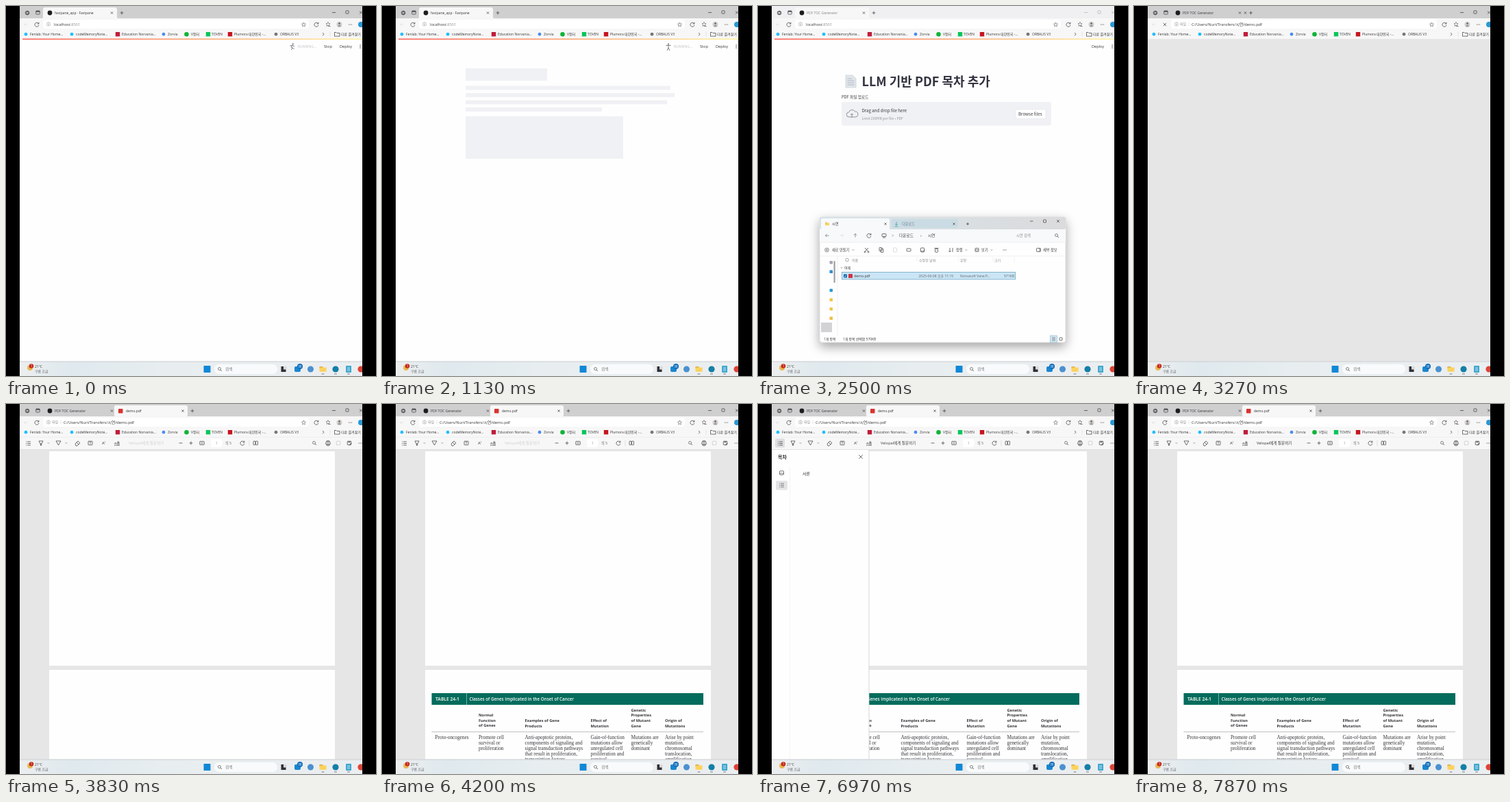
Animation of 540 by 540 pixels, one loop 8 s. Source, as an HTML page:

```html
<!DOCTYPE html>
<html>
<head>
<meta charset="utf-8">
<title>PDF TOC demo</title>
<style>
html, body { margin: 0; width: 100%; height: 100%; overflow: hidden; background: #000; }
svg { display: block; width: 100vw; height: 100vh; }
text { font-family: "Open Sans", "Noto Sans CJK KR", "Noto Sans CJK", sans-serif; white-space: pre; }
.kr text, text.kr { font-family: "Noto Sans CJK KR", "Noto Sans CJK", sans-serif; }
.serif text { font-family: "Liberation Serif", serif; }
</style>
</head>
<body>
<svg id="stage" viewBox="0 0 540 540"></svg>
<script>
const INK = '#36363a', DIM = '#8b8b90', PAPER = '#fefefe', BAR = '#f7f7f7', GRAY = '#e6e6e7', RULE = '#e0e0e2';

const attrs = o => Object.entries(o).map(([k, v]) => ` ${k}="${v}"`).join('');
const text = (x, y, size, s, o = {}) =>
  `<text${attrs({ x, y, 'font-size': size, fill: INK, ...o })}>${s}</text>`;
const rect = (x, y, width, height, fill, o = {}) =>
  `<rect${attrs({ x, y, width, height, fill, ...o })}/>`;
const dot = (cx, cy, r, fill, o = {}) => `<circle${attrs({ cx, cy, r, fill, ...o })}/>`;
const line = (d, o = {}) =>
  `<path${attrs({ d, fill: 'none', stroke: INK, 'stroke-width': 0.7, ...o })}/>`;
const group = (id, body, o = {}) => `<g${attrs({ id, ...o })}>${body}</g>`;
const lines = (x, y, gap, size, list, o) =>
  list.map((s, i) => text(x, y + i * gap, size, s, o)).join('');

// small line icons
const cross = (x, y, r = 1.6, o) => line(`M${x - r} ${y - r}l${2 * r} ${2 * r}m0 ${-2 * r}l${-2 * r} ${2 * r}`, o);
const plus = (x, y, r = 2.4, o) => line(`M${x - r} ${y}h${2 * r}M${x} ${y - r}v${2 * r}`, o);
const caret = (x, y, o) => line(`M${x - 1.3} ${y - .6}l1.3 1.3 1.3-1.3`, { 'stroke-width': .5, ...o });
const box = (x, y, w, h, o = {}) => rect(x - w / 2, y - h / 2, w, h, 'none', { stroke: INK, 'stroke-width': .7, rx: .8, ...o });
const ring = (x, y, r, o = {}) => dot(x, y, r, 'none', { stroke: INK, 'stroke-width': .6, ...o });
const more = (x, y) => [-2, 0, 2].map(d => dot(x + d, y, .55, INK)).join('');
const lens = (x, y) => ring(x - .5, y - .5, 2) + line(`M${x + 1} ${y + 1}l2 2`);
const spin = (x, y) => line(`M${x + 2.6} ${y - 1.2}a3 3 0 1 0 .3 2M${x + 2.9} ${y - 3.2}v2.2h-2.2`);
const star = (x, y) => line(`M${x} ${y - 3}l.9 2 2.1.2-1.6 1.5.5 2.2-1.9-1.1-1.9 1.1.5-2.2-1.6-1.5 2.1-.2z`, { 'stroke-width': .5 });
const folder = (x, y, w = 9) =>
  rect(x - w / 2, y - w * .38, w * .5, w * .3, '#dfa22c', { rx: .6 }) + rect(x - w / 2, y - w * .25, w, w * .62, '#fad25c', { rx: .8 });
const arrow = (x, y, turn, o) => `<g transform="translate(${x} ${y}) rotate(${turn})">${line('M-2.6 0h5.2M.4-2l2.2 2-2.2 2', { 'stroke-width': .5, ...o })}</g>`;

function windowFrame() {
  let s = rect(20, 0, 500, 18, '#cfcfd0', { id: 'tabbar' });
  s += ring(31, 10, 2.8, { 'stroke-width': .8 }) + line('M30 8.5h3v3h-3z') + box(46.5, 9.5, 5.5, 5) + line('M44 8h5', { 'stroke-width': 1.4 });
  s += group('tab1Bg', line('M52 18q2 0 2-2V5q0-3 3-3h102q3 0 3 3v11q0 2 2 2z', { fill: BAR, stroke: 'none' }));
  s += dot(64, 10, 3.4, '#1d1d20') + cross(154.5, 10);
  s += group('titleA', text(71, 12, 5, 'fastpane_app · Fastpane'));
  s += group('titleB', text(71, 12, 5, 'PDF TOC Generator'));
  s += group('tab2', rect(158, 2, 9, 16.5, BAR, { id: 'tab2Bg', rx: 2.5 }) +
    group('tab2Label', rect(164, 7, 6.5, 6.5, '#d8342f', { rx: .8 }) + text(175, 12, 5, 'demo.pdf')) +
    group('close2', cross(0, 10)));
  s += group('newTab', plus(0, 10));
  s += group('winButtons', line('M476 9.5h5') + box(498, 9, 4.2, 4.2) + cross(518, 9.5, 2));
  s += rect(20, 18, 500, 31, BAR);
  s += rect(54, 20, 388, 13, '#fff', { rx: 4 });
  s += arrow(29, 27, 180, { stroke: '#d4d4d6' });
  s += group('reload', spin(45, 27)) + group('stopLoad', cross(45, 27, 2.2));
  s += ring(62, 26.5, 2.7, { stroke: DIM, 'stroke-width': .5 }) + line('M62 26v2M62 24.6v.7', { 'stroke-width': .5 });
  s += group('urlApp', text(70, 28.5, 5.7, 'localhost<tspan fill="#8f8f94">:8501</tspan>'));
  s += group('urlFile', text(67, 28.4, 5, '파일', { fill: DIM }) + line('M80 24v5', { stroke: '#c8c8ca', 'stroke-width': .5 }) +
    text(84, 28.5, 5.7, 'C:/Users/Nuri/Transfers/시연/demo.pdf'));
  s += star(434.5, 27) + spin(453, 27) + star(470, 26.5) + line('M470 29.5h4', { 'stroke-width': .5 });
  s += dot(486.5, 27, 4.2, '#d5d3d1') + dot(486.5, 25.6, 1.5, '#75706c') + line('M483.8 29.6q2.7-3 5.4 0z', { fill: '#75706c', stroke: 'none' });
  s += more(502.5, 27) + dot(518, 27, 4, '#2b97d3');
  const marks = [
    [29, 35, '#20beff', 'Fenlab: Your Home...'], [96, 102, '#20beff', 'codeMemoryNote...'],
    [163, 169, '#c01c3a', 'Education Norvania...'], [230, 236, '#4c8df0', 'Zorvia'],
    [263.5, 270, '#10b338', 'V장터'], [295, 300, '#08c55b', 'TOVEN'],
    [327, 333, '#c4161f', 'Plumora 대한민국 -...'], [394, 400, '#77777c', 'ORBALIS V3']];
  marks.forEach(([ix, tx, c, label], i) => {
    s += [2, 5, 6].includes(i) ? rect(ix - 3.2, 38, 6.4, 6.4, c) : dot(ix, 41.2, i === 4 ? 3.3 : 2.4, c);
    s += text(tx, 43.2, 5, label);
  });
  s += line('M462 39l2 2.2-2 2.2') + line('M473 37v8', { stroke: '#d0d0d2', 'stroke-width': .5 });
  s += line('M479.5 38.5h2.5l1 1h4v4.6h-7.5z') + text(489, 43.2, 5, '다른 즐겨찾기');
  return s;
}

function appPage() {
  let s = rect(20, 48, 500, 471, PAPER);
  s += rect(24, 47.6, 496, 1.5, 'url(#glow)');
  s += text(487, 61, 5.6, 'Deploy') + [-2.2, 0, 2.2].map(d => dot(517, 59 + d, .65, INK)).join('');
  const poses = ['M0-1.5l-2 2.5 2 1-1.5 3M0 2l2.5 1.5M-3.5-1l3.5-.5 3 1.5', 'M0-2v4l-2 4M0 2l2 4M-3.5-1.5h7', 'M0-2l-1 3.5 2.5 1.5-1 3M-1 1.5l-3 2.5M0-1.5l3-2.5'];
  s += group('running',
    poses.map((d, i) => `<g id="pose${i}" transform="translate(418 59)">${dot(i ? 0 : .8, -3.5, 1.1, '#6c6d75')}${line(d, { stroke: '#6c6d75', 'stroke-width': .9 })}</g>`).join('') +
    text(426, 60.8, 5, 'RUNNING...', { fill: '#bfc0c6' }) + text(464, 61, 5.6, 'Stop'));
  const bones = [[91, 119, 18], [116.5, 299, 6], [127, 305, 6], [137.5, 294, 6], [148, 199, 6], [161, 230, 62]];
  s += group('skeleton', bones.map(([y, w, h]) => rect(122, y, w, h, '#f0f1f4', { rx: 1 })).join(''));
  let app = line('M128 101h10l5 5v13h-15z', { fill: '#e1e6ea', stroke: '#c6ced4' }) + line('M130.5 106h7m-7 3h10m-10 3h10m-10 3h10', { stroke: '#9aa8b2' });
  app += text(151.5, 116.5, 18, 'LLM 기반 PDF 목차 추가', { 'font-weight': 700, fill: '#31333f' });
  app += text(122, 135, 5.7, 'PDF 파일 업로드');
  app += rect(122, 140, 306, 34.5, '#f0f1f4', { rx: 3 });
  app += line('M133 162a3.5 3.5 0 0 1-.4-7 5 5 0 0 1 9-1 4 4 0 0 1 .6 8zM137 163v-6m-2 2l2-2 2 2', { stroke: '#85868f', 'stroke-width': .9 });
  app += text(151.5, 155, 6.2, 'Drag and drop file here') + text(151.5, 165.5, 5.1, 'Limit 200MB per file • PDF', { fill: '#94959d' });
  app += rect(376, 151, 44, 13.5, '#fff', { rx: 3, stroke: '#e3e4e8', 'stroke-width': .6 }) + text(380, 159.6, 6.2, 'Browse files');
  return s + group('upload', app, { class: 'kr' });
}

function explorer() {
  let s = rect(90, 308, 359, 183, PAPER, { rx: 3, stroke: '#bcbcc0', 'stroke-width': .5, filter: 'url(#shadow)' });
  s += rect(90, 308, 359, 18, 'url(#cap)', { rx: 3 }) + rect(92, 310, 100, 17, '#f7f9fa', { rx: 2 });
  s += rect(195, 311, 97, 13, '#cbdbe3', { rx: 2 });
  s += folder(101, 318, 6) + text(108, 320, 5.2, '시연') + cross(186, 318, 1.5);
  s += line('M202 315v5m-1.8-1.8l1.8 1.8 1.8-1.8m-4 3.6h4.4', { stroke: '#1f9aa0' }) + text(210, 320, 5.2, '다운로드', { fill: '#5d7f8e' }) + cross(286, 318, 1.5) + plus(306, 318, 2);
  s += line('M397 314h4.4') + box(418.5, 314, 4, 4) + cross(438, 314, 1.9);
  s += rect(90, 326, 359, 19, '#f7f9fa');
  s += arrow(101, 335, 180) + arrow(122, 335, 0, { stroke: '#c8c8cc' }) + arrow(142, 335, -90) + spin(162, 335);
  s += box(184, 334.5, 6, 4) + line('M182 338h4') + line('M196 333.5l1.5 1.5-1.5 1.5', { 'stroke-width': .5 });
  s += text(206, 337, 5.7, '다운로드') + text(237, 337, 5.7, '›') + text(248, 337, 5.7, '시연');
  s += text(377, 337, 5.3, '시연 검색', { fill: DIM }) + lens(436, 335);
  s += line('M90 345h359M90 365h359', { stroke: RULE, 'stroke-width': .5 });
  s += ring(100.5, 356, 2.8) + plus(100.5, 356, 1.5, { 'stroke-width': .5 }) + text(108, 358, 5.2, '새로 만들기') + caret(139, 356);
  s += line('M156 353l5 5.5m0-5.5l-5 5.5') + ring(156, 359, 1) + ring(161, 359, 1);
  s += box(179, 355, 4, 5) + box(181, 357, 4, 5) + box(200, 356, 5, 6, { stroke: '#cfcfd2' }) + box(220, 356, 6, 4) + box(240, 356, 5, 6) + line('M238 358h4l1-2') + box(260.5, 356.8, 4, 5) + line('M257.5 353.5h6');
  s += line('M280 353v6m-1.5-1.5l1.5 1.5 1.5-1.5M284 359v-6') + text(289, 358, 5.2, '정렬') + caret(304, 356);
  s += box(319.5, 356, 5, 5) + line('M317 356h5') + text(326, 358, 5.2, '보기') + caret(341, 356) + more(360, 356);
  s += box(409.5, 356, 6, 5) + line('M411 354v4') + text(416, 358, 5.2, '세부 정보');
  ['#a9a3b4', '#2f8fd0', 'none', '#2c9bd6', '#f3c34a', '#f3c34a', '#efbd48'].forEach((c, i) =>
    s += rect(104.5, 372 + i * 13.6, 4.5, 4.5, c, { rx: .7 }));
  s += rect(92, 462, 16, 14, '#d3d3d5') + rect(110.5, 372, 2.2, 32, '#a0a0a4', { rx: 1 }) + line('M116 366v115', { stroke: RULE, 'stroke-width': .5 });
  s += box(130, 370.5, 4, 4, { stroke: DIM });
  [[137, '이름'], [235, '수정한 날짜'], [295, '유형'], [345, '크기']].forEach(([x, l]) => s += text(x, 372.5, 5, l, { fill: DIM }));
  s += line('M232 367v7M293 367v7M343 367v7M374 367v7', { stroke: RULE, 'stroke-width': .4 });
  s += caret(122, 382) + text(126, 384.2, 5, '어제');
  s += group('rowHover', rect(122.5, 388.5, 253, 10.5, '#e5f3fb'));
  s += group('rowPick', rect(122.5, 388.5, 253, 10.5, '#cbe5f5', { stroke: '#5f9fbd', 'stroke-width': .7 }) +
    rect(125, 391.5, 5, 5, '#0f67b0', { rx: .7 }) + line('M126 394l1.2 1.2 2-2.3', { stroke: '#fff' }));
  s += rect(132, 391, 6, 6, '#cf3442', { rx: .6 }) + text(140, 396, 5.2, 'demo.pdf');
  [[234.5, '2025-06-08 오후 11:15'], [295, 'Norvasoft Vane P...'], [359, '571KB']].forEach(([x, l]) => s += text(x, 396, 5, l, { fill: '#5f666c' }));
  s += text(96, 488, 4.9, '1개 항목') + group('status', text(124, 488, 4.9, '1개 항목 선택함 570KB'));
  return s + rect(426.5, 481, 10, 10, '#d3e7f3', { stroke: '#79a9c4', 'stroke-width': .5 }) + line('M429 484h5m-5 2h5m-5 2h5', { 'stroke-width': .5 }) + box(442, 486, 4, 4);
}

function pdfPages() {
  let s = group('sheet', rect(63, 69, 417, 313, PAPER) + rect(63, 388, 417, 131, PAPER));
  let t = rect(72.5, 422, 396.5, 17, '#046c5c') + line('M123.5 422v17', { stroke: '#8fc0b4', 'stroke-width': .8 });
  t += text(78, 433, 6.6, 'TABLE 24-1', { fill: '#d9e8dc', 'font-weight': 700 }) +
    text(127.5, 433, 6.25, 'Classes of Genes Implicated in the Onset of Cancer', { fill: '#fff', 'font-weight': 600 });
  const heads = [[141, 456, 'Normal|Function|of Genes'], [208.5, 464, 'Examples of Gene|Products'], [304.5, 464, 'Effect of|Mutation'],
    [363.5, 448.7, 'Genetic|Properties|of Mutant|Gene'], [413, 464, 'Origin of|Mutations']];
  heads.forEach(([x, y, s]) => t += lines(x, y, 7.7, 5.7, s.split('|'), { 'font-weight': 700 }));
  t += line('M72.5 478.5h396.5', { stroke: '#a3aaa8', 'stroke-width': .7 });
  const cells = [[77.5, 'Proto-oncogenes'], [141, 'Promote cell|survival or|proliferation'],
    [208.5, 'Anti-apoptotic proteins,|components of signaling and|signal transduction pathways|that result in proliferation,|transcription factors'],
    [304.5, 'Gain-of-function|mutations allow|unregulated cell|proliferation and|survival'],
    [363.5, 'Mutations are|genetically|dominant'], [413, 'Arise by point|mutation,|chromosomal|translocation,|amplification']];
  t += group('cells', cells.map(([x, s]) => lines(x, 489, 8, 7.3, s.split('|'))).join(''), { class: 'serif' });
  return rect(20, 48, 500, 471, GRAY) + s + group('table', t);
}

function pdfBar() {
  let s = rect(20, 48.5, 500, 18, BAR) + line('M20 66.5h500', { stroke: '#d6d6d8', 'stroke-width': .6 });
  s += group('tocOn', rect(25, 50.5, 14, 13, '#dedee0', { rx: 2 }));
  s += group('penHover', rect(65, 49.5, 22.5, 14, '#e4e4e6', { rx: 2 }));
  s += line('M29 55h1m1 0h5M29 57.5h1m1 0h5M29 60h1m1 0h5');
  s += line('M48 54h6l-2 4h-2zM50 58l1 3 1-3') + caret(62, 57) + line('M73 54h7l-3.5 6z') + caret(88, 57);
  s += line('M101 58l4-4 3 3-4 4h-2zM103 56l3 3') + box(123, 57, 6, 5.5) + line('M121.5 55.7h3M123 55.7v3', { 'stroke-width': .5 });
  s += text(140, 59.2, 6, 'A') + text(144, 56.5, 3.7, ')') + text(158, 59.2, 5.5, 'aあ') + line('M158 60.5h8', { 'stroke-width': .5 });
  s += group('askDim', text(179, 59.2, 5.6, 'Velopal에게 질문하기', { fill: '#d0d0d3' })) + group('askInk', text(179, 59.2, 5.6, 'Velopal에게 질문하기'));
  s += line('M252.5 57h5') + plus(270, 57, 2.5) + box(286, 57, 6.5, 5) + line('M284 57h4');
  s += rect(299, 51, 16, 12, '#fff', { rx: 1.5 }) + text(306, 59, 5, '1', { fill: DIM }) + text(320, 59, 5.2, '의 5', { fill: '#66666b' });
  s += spin(345, 57) + line('M355 53v8', { stroke: '#c6c6c9', 'stroke-width': .5 }) + box(362.5, 57, 3, 5.5) + box(366, 57, 3, 5.5);
  s += lens(450, 57) + box(470, 57.2, 6.5, 3.5) + box(470, 54.5, 4, 2) + box(470, 59.5, 4, 2.5);
  s += box(485, 57, 5.5, 5.5, { stroke: '#c3c3c6' }) + box(501, 57, 5.5, 5.5) + line('M499.5 55.5h3M501 60l3-3', { 'stroke-width': 1 }) + more(517, 57);
  return s;
}

function tocPanel() {
  let s = rect(20, 66.5, 142, 452.5, PAPER) + line('M162 66.5v452.5', { stroke: '#cdcdd0', 'stroke-width': .8 });
  s += text(29, 80, 7, '목차', { 'font-weight': 700, class: 'kr' }) + cross(150, 77, 2.8);
  s += rect(26, 112, 17, 13.5, '#e4e4e6', { rx: 1.5 }) + line('M46.5 92v427', { stroke: '#ededee', 'stroke-width': .6 });
  s += box(34.5, 100.5, 6, 5.5) + line('M32 102l2-1.5 1.5 1.5 1.5-1') + line('M31 116h1m1 0h5M31 118.5h1m1 0h5M31 121h1m1 0h5', { 'stroke-width': .6 });
  s += group('itemHover', rect(49, 95, 109, 14, '#f0f0f1', { rx: 2 }));
  return s + group('items', text(65, 104.3, 6, '서론'), { class: 'kr' });
}

function taskbar() {
  let s = rect(20, 518.5, 500, 21.5, 'url(#task)') + line('M20 519h500', { stroke: '#c3c6c9', 'stroke-width': .8 });
  s += dot(35, 528, 4, '#e9b955') + dot(37, 525.5, 3.3, '#c42b1c') + text(36, 527.2, 4.4, '1', { fill: '#fff' });
  s += text(42, 528, 5, '21°C') + text(42, 535, 5, '구름 조금', { fill: '#63666b' });
  s += rect(288.5, 525, 10, 10, '#1188d6', { rx: .8 });
  s += rect(304, 523, 92, 14, '#f9fafb', { rx: 6.5 }) + lens(312, 530) + text(320, 532, 5.8, '검색', { fill: '#75767b' });
  s += rect(401.5, 526, 7, 8, '#2f2f33') + rect(405, 526, 4.5, 4.5, '#d9d9dc');
  s += rect(421, 526, 9, 8, '#1a86d0', { rx: 2 }) + dot(429, 526, 4, '#0f6cbd') + text(426.3, 528, 4.5, '39', { fill: '#fff' });
  s += group('folderHover', rect(454, 521.5, 17, 17, '#f9fafb', { rx: 2 }));
  s += dot(444.5, 530, 4.5, '#4a90d0') + folder(462.5, 530, 10) + dot(481, 530, 4.6, '#157fa6') + rect(496, 525, 8, 10, '#3fa9cf', { rx: 1 }) + line('M498 528h4m-4 2h4m-4 2h4', { stroke: '#e6f3f8' });
  s += dot(518, 530, 4.6, '#db4437');
  return s + [462.5, 481, 500].map(x => rect(x - 2, 536.6, 4, 1, '#77787c', { rx: .5 })).join('');
}

const svg = document.getElementById('stage');
svg.innerHTML = `<defs>
<linearGradient id="glow"><stop offset="0" stop-color="#ff5a50"/><stop offset=".5" stop-color="#ff9f6a"/><stop offset="1" stop-color="#fff3a0"/></linearGradient>
<linearGradient id="cap"><stop offset="0" stop-color="#d5e3ea"/><stop offset=".55" stop-color="#d9dfe2"/><stop offset="1" stop-color="#dbdbdd"/></linearGradient>
<linearGradient id="task"><stop offset="0" stop-color="#eceeef"/><stop offset=".15" stop-color="#dfe9ee"/><stop offset=".45" stop-color="#e8eef0"/><stop offset="1" stop-color="#ebeef0"/></linearGradient>
<filter id="shadow" x="-20%" y="-20%" width="140%" height="150%"><feDropShadow dx="0" dy="6" stdDeviation="8" flood-color="#000" flood-opacity=".36"/></filter>
<clipPath id="view"><rect x="20" width="500" height="540"/></clipPath>
<clipPath id="content"><rect x="20" y="47" width="500" height="472"/></clipPath>
</defs>` + rect(0, 0, 540, 540, '#000') +
  group('desk', windowFrame() +
    group('body', group('app', appPage()) + group('pdf', pdfPages() + group('panel', tocPanel()) + group('pdfBar', pdfBar())), { 'clip-path': 'url(#content)' }) +
    group('files', explorer()) + taskbar(), { 'clip-path': 'url(#view)' });

const el = {};
svg.querySelectorAll('[id]').forEach(n => el[n.id] = n);
const ramp = (t, a, b) => Math.min(1, Math.max(0, (t - a) / (b - a)));
const out = p => 1 - (1 - p) ** 3;
const mix = (a, b, p) => a + (b - a) * p;
const show = (id, v) => {
  el[id].style.display = v > 0 ? '' : 'none';
  el[id].style.opacity = +v;
};
const move = (id, x, y = 0) => el[id].setAttribute('transform', `translate(${x} ${y})`);

// [id, visible from, visible until]
const spans = [
  ['titleA', 0, 1270], ['titleB', 1270, 8000], ['running', 0, 1400], ['upload', 1300, 3270],
  ['tab1Bg', 0, 3270], ['tab2', 3270, 8000], ['tab2Label', 3370, 8000],
  ['urlApp', 0, 3270], ['urlFile', 3270, 8000], ['stopLoad', 3270, 3440],
  ['app', 0, 3270], ['files', 1770, 3270], ['rowPick', 2370, 3270], ['status', 2370, 3270],
  ['pdf', 3270, 8000], ['pdfBar', 3670, 8000], ['sheet', 3830, 8000], ['table', 4000, 8000], ['cells', 4070, 8000],
  ['panel', 4930, 7850], ['items', 5370, 8000], ['tocOn', 4930, 7700]];

function render(t) {
  for (const [id, a, b] of spans) show(id, t >= a && t < b);
  show('reload', t < 3270 || t >= 3440);

  // the sport changes every 110 ms
  const pose = Math.floor(t / 110) % 3;
  for (let i = 0; i < 3; i++) show('pose' + i, i === pose);
  show('skeleton', t < 1300 ? ramp(t, 430, 830) * (.9 + .1 * Math.cos((t - 1130) / 120)) : 0);

  const away = t < 3270 ? ramp(t, 1770, 1900) : 0;
  el.tabbar.setAttribute('fill', away > .5 ? '#f0f0f2' : '#cfcfd0');
  el.winButtons.style.opacity = 1 - .65 * away;
  el.titleB.style.opacity = 1 - .4 * away;
  show('folderHover', ramp(t, 1330, 1420) * (1 - ramp(t, 2030, 2150)));

  const open = out(ramp(t, 1770, 2050)), k = mix(.86, 1, open);
  if (t >= 1770 && t < 3270) {
    show('files', Math.max(.01, ramp(t, 1770, 1930)));
    el.files.setAttribute('transform', `translate(${270 * (1 - k)} ${400 * (1 - k) + 50 * (1 - open)}) scale(${k})`);
  }
  show('rowHover', ramp(t, 2200, 2290));

  const grow = out(ramp(t, 3270, 3470));
  show('tab2Bg', grow);
  el.tab2Bg.setAttribute('width', mix(8, 107, grow));
  move('close2', mix(161, 258, grow));
  move('newTab', mix(169, 272, grow));

  show('penHover', ramp(t, 4370, 4420) * (1 - ramp(t, 4470, 4530)));
  const slide = out(ramp(t, 4930, 5170)) * (1 - ramp(t, 7570, 7850) ** 2);
  move('panel', -144 * (1 - slide));
  show('itemHover', ramp(t, 5660, 5740) * (1 - ramp(t, 5850, 5930)));
  const ask = ramp(t, 6600, 7000);
  show('askDim', 1 - ask);
  show('askInk', ask);
}

const start = performance.now();
function tick() {
  render((performance.now() - start) % 8000);
  requestAnimationFrame(tick);
}
tick();
</script>
</body>
</html>
```
